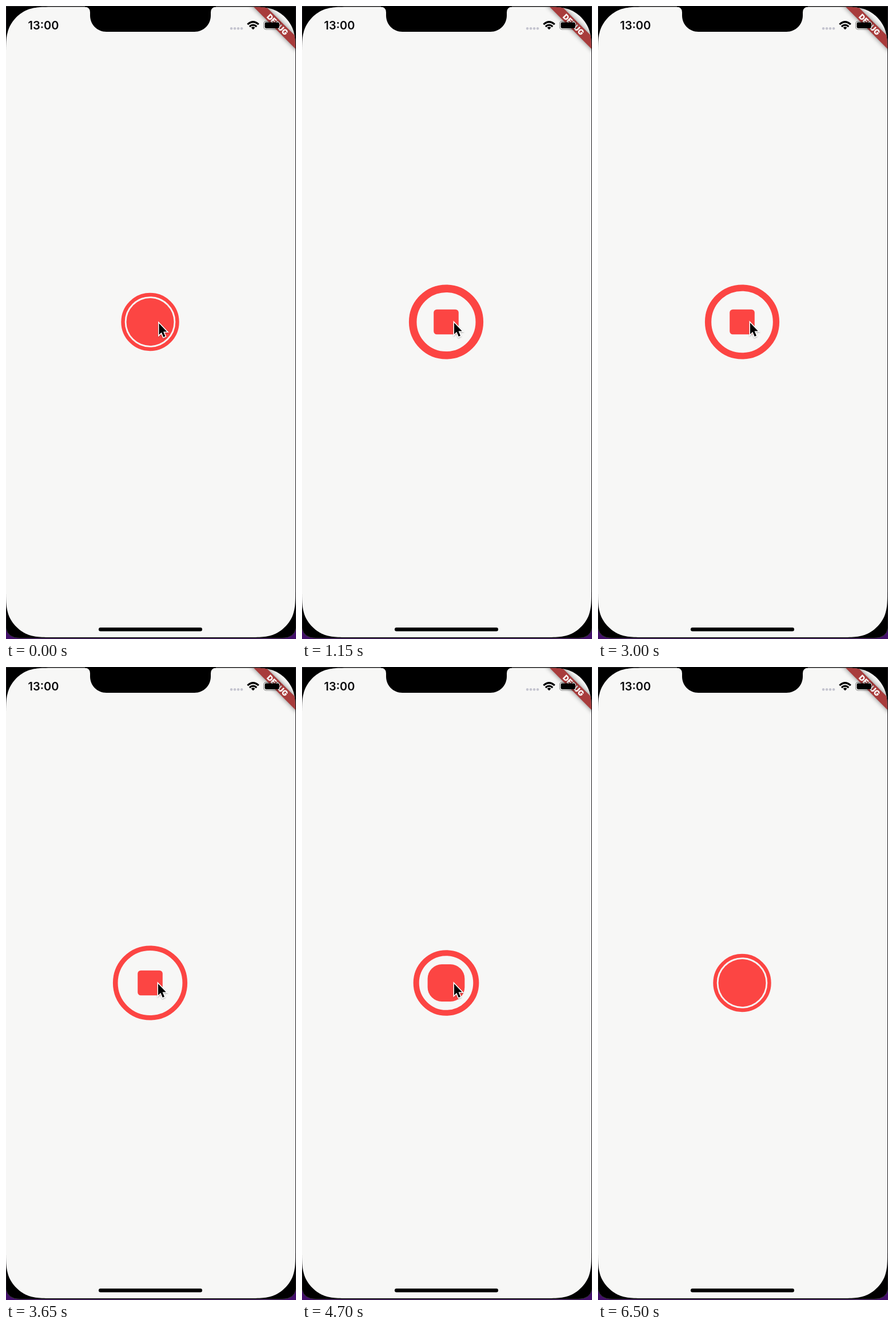
Write an HTML page that moves like this. It is 507 px wide and 1105 px high and loops after 6650 ms.

```html
<!DOCTYPE html>
<html lang="en">
<head>
<meta charset="utf-8">
<title>Record button</title>
<style>
  html, body { margin: 0; width: 100%; height: 100%; overflow: hidden; background: #000; }
  svg { display: block; width: 507px; height: 1105px; }
  text { font-family: Inter, Roboto, sans-serif; }
</style>
</head>
<body>
<svg viewBox="0 0 507 1105">
  <defs>
    <clipPath id="screen">
      <path d="M0 93C0 61 0 54 4.3 41C9.8 25.5 24 11.3 39.5 5.8C53 1.5 62 1.5 94 1.5H412C444 1.5 453 1.5 466.5 5.8C482 11.3 496.2 25.5 501.7 41C506 54 506 61 506 93V1010C506 1042 506 1049 501.7 1062.5C496.2 1078 482 1092.2 466.5 1097.7C453 1102 444 1102 412 1102H94C62 1102 53 1102 39.5 1097.7C24 1092.2 9.8 1078 4.3 1062.5C0 1049 0 1042 0 1010Z"/>
    </clipPath>
    <filter id="soft" x="-50%" y="-150%" width="200%" height="400%">
      <feGaussianBlur stdDeviation="4"/>
    </filter>
    <filter id="drop" x="-50%" y="-50%" width="200%" height="200%">
      <feDropShadow dx="0" dy="1.2" stdDeviation="1" flood-opacity=".3"/>
    </filter>
    <path id="arrow" d="M2 3.6V23.4L6.3 19.3L9.8 27.4L13 26L9.6 18.1H15.8Z"
      fill="#000" stroke="#fff" stroke-width="3" paint-order="stroke" filter="url(#drop)"/>
  </defs>

  <!-- phone body -->
  <rect width="507" height="1105" fill="#43106a"/>
  <path d="M0 0H507V1086Q504 1103.5 482 1103.5H25Q3 1103.5 0 1086Z" fill="#000" stroke="#38343c"/>
  <path d="M0 .5H507" stroke="#2b2b2d"/>

  <g clip-path="url(#screen)">
    <rect width="506" height="1105" fill="#f7f7f6"/>
    <g transform="translate(474.7 32.3) rotate(45)">
      <rect x="-60" y="-7.8" width="120" height="15.6" filter="url(#soft)" opacity=".5"/>
      <rect x="-60" y="-7.8" width="120" height="15.6" fill="#a83c3c"/>
      <text y="4.8" text-anchor="middle" font-size="13.2" font-weight="900" fill="#fff">DEBUG</text>
    </g>
  </g>

  <!-- status bar -->
  <path d="M138 0V1.5Q147 2 147 11V16.5C147 32.5 159.5 45 175.5 45H329.5C345.5 45 358 32.5 358 16.5V11Q358 2 367 1.5V0Z"/>
  <text x="38.5" y="41" font-size="20" font-weight="600" fill="#0b0b0d">13:00</text>
  <g fill="#c4c4cf">
    <circle cx="394" cy="39.3" r="2.2"/><circle cx="400" cy="39.3" r="2.2"/>
    <circle cx="406" cy="39.3" r="2.2"/><circle cx="412" cy="39.3" r="2.2"/>
  </g>
  <g fill="none" stroke="#000" stroke-width="3.2">
    <path d="M422.3 32.2Q432 23.2 441.7 32.2"/>
    <path d="M425.8 36Q432 30.4 438.2 36"/>
    <path d="M428.6 37.7Q432 35 435.4 37.7L432 41.2Z" fill="#000" stroke="none"/>
  </g>
  <rect x="450.5" y="26.8" width="29.5" height="14" rx="4" fill="none" stroke="#000" stroke-opacity=".4" stroke-width="1.2"/>
  <rect x="452.4" y="28.6" width="25.4" height="10.4" rx="2.4"/>
  <path d="M481.6 31.6Q484 33.8 481.6 36Z" opacity=".45"/>

  <rect x="162" y="1085" width="181" height="6.5" rx="3.2"/>

  <!-- record button -->
  <circle id="ring" cx="252" cy="551.5" fill="none" stroke="#fc4543"/>
  <rect id="core" fill="#fc4543"/>

  <use id="trail" href="#arrow"/>
  <use id="cursor" href="#arrow"/>
</svg>
<script>
const LOOP = 6650, STEP = 50;
const START = 270, SPAN = 800, STOP = 4270;
const CX = 252, CY = 551.5;
const $ = id => document.getElementById(id);
const clamp = v => Math.max(0, Math.min(1, v));
const mix = (a, b, k) => a + (b - a) * k;

function set(el, attrs) {
  for (const name in attrs) el.setAttribute(name, attrs[name]);
}

function drawButton(t) {
  const open = t < STOP ? clamp((t - START) / SPAN) : 1 - clamp((t - STOP) / SPAN);
  // pulse swings linearly between thick (1) and thin (0)
  const swing = Math.max(0, Math.min(t, STOP) - START - SPAN) / SPAN % 2;
  const pulse = Math.abs(1 - swing);
  const width = mix(6.4, mix(7, 14.3, pulse), open);
  const outer = mix(50.7, 65.1, open);
  set($('ring'), { r: outer - width / 2, 'stroke-width': width });

  const side = mix(83, 43.6, open);
  set($('core'), {
    x: CX - side / 2, y: CY - side / 2, width: side, height: side,
    rx: mix(41.5, 5.5, open)
  });
}

function place(el, x, y, shown) {
  set(el, { transform: `translate(${x} ${y})`, visibility: shown ? 'visible' : 'hidden' });
}

function drawCursor(t) {
  const rest = clamp(t / 150);
  let x = mix(265.5, 264, rest), y = mix(550.5, 549.5, rest);
  const leave = (t - 5400) / 350;
  if (leave > 0) {
    const k = Math.pow(leave, 1.4);
    x -= 66 * k;
    y -= 570 * k;
  }
  place($('cursor'), x, y, t < 5750);
  place($('trail'), 264, 548, t >= 5450 && t < 5500);
}

const begin = performance.now();

function frame() {
  const t = Math.floor((performance.now() - begin) % LOOP / STEP) * STEP;
  drawButton(t);
  drawCursor(t);
  requestAnimationFrame(frame);
}
frame();
</script>
</body>
</html>
```
